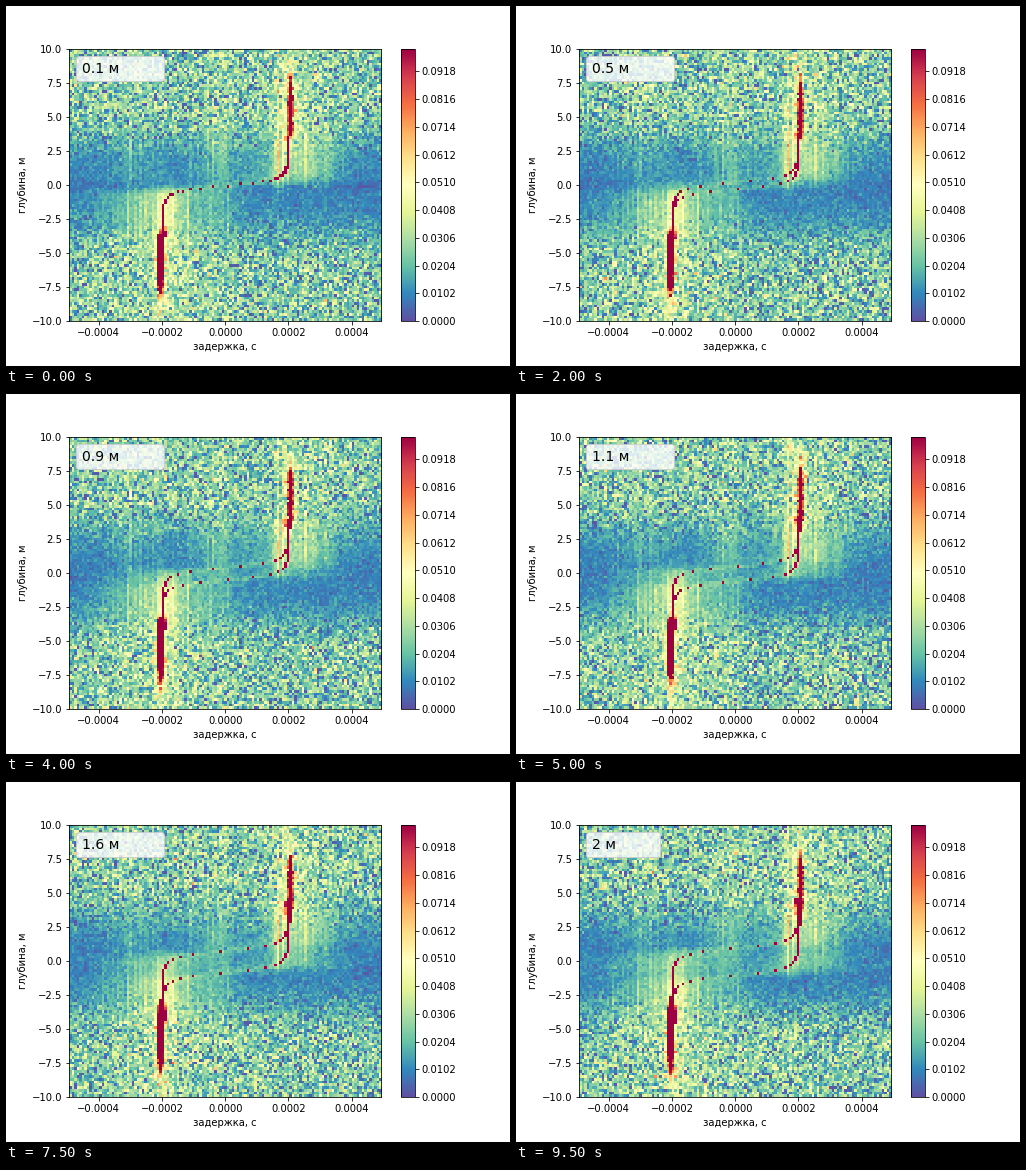
A matplotlib script for the animation above (10 s loop, 504 by 360 pixels).

```python
import numpy as np
import matplotlib.pyplot as plt
from matplotlib.animation import FuncAnimation
from matplotlib.lines import Line2D

plt.rcParams["font.family"] = "DejaVu Sans"
plt.rcParams["font.size"] = 10

COLS, ROWS, FRAMES = 125, 100, 20
LAG_LIMIT = 0.0004941
MAX_DELAY = 0.000203    # s, delay far above or below a source
RANGE = 0.43            # m, sets the steepness of the delay curve
RECEIVER_DEPTH = 0.04

lag_step = 2 * LAG_LIMIT / COLS
cols = np.arange(COLS)
lags = (cols + 0.5) * lag_step - LAG_LIMIT
depths = np.linspace(-10, 10, ROWS + 1)[1:]
dist = np.abs(depths)[:, None]


def smoothstep(v):
    v = np.clip(v, 0, 1)
    return v * v * (3 - 2 * v)


def hump(centre, width):
    """Bell over the delay axis, in microseconds."""
    return np.exp(-((lags * 1e6 - centre) / width) ** 2)


def streaked(level, seed, spread):
    """Sidelobe level per column, broken into fixed thin streaks."""
    rng = np.random.default_rng(seed)
    return 0.0105 + level * np.exp(rng.normal(0, spread, COLS))


above = streaked(0.020 * hump(200, 60) + 0.008 * hump(-35, 65)
                 + 0.007 * hump(300, 60) + 0.006 * hump(-290, 70), 4, 0.5)
below = streaked(0.012 * hump(-230, 130) + 0.013 * hump(-185, 60)
                 + 0.007 * hump(-40, 70), 9, 0.35)
blend = smoothstep((dist - 1.3) / 4.7)            # quiet centre to noisy far field
swell = smoothstep((dist - 2.2) / 2.2)            # ridge widens away from the sources
tip = 1 / (1 + np.exp((dist - 7.3) / 0.33))       # ridge fades at its ends
limit = np.where(depths > 0, 0.72, 1.0)[:, None]
width = 0.42 + (limit - 0.42) * swell


def delay_fraction(source_depth):
    u = depths - source_depth - RECEIVER_DEPTH
    return u / np.hypot(u, RANGE)


def correlogram(k):
    rng = np.random.default_rng(100 + k)
    half = 0.05 * (k + 1)
    branches = np.array([delay_fraction(half), delay_fraction(-half)])
    mix = (1 + branches.mean(axis=0))[:, None] / 2

    near = mix * above + (1 - mix) * below
    near = near * (0.6 + 0.4 * (branches ** 2).mean(axis=0)[:, None])
    far = 0.0265 + 0.35 * (near - 0.018)
    field = near + (far - near) * blend
    field += rng.normal(0, 1, field.shape) * (0.003 + 0.0095 * blend)

    peak = 0.26 * tip * np.exp(rng.normal(0, 0.35, field.shape) * swell)
    ridge = np.zeros_like(field)
    for frac in branches:
        centre = np.floor((frac * MAX_DELAY + LAG_LIMIT) / lag_step)[:, None]
        offset = cols - centre
        glow = 0.022 * swell * np.exp(-(offset / 2.5) ** 2 - (dist / 9.3) ** 12)
        sidelobe = 0.012 * (1 - blend) * np.exp(-np.abs(offset) / 12)
        line = peak * np.exp(-(offset / width) ** 2)
        ridge = np.maximum(ridge, line + glow + sidelobe)
    return np.clip(field + ridge, 0.002, None)


fig, ax = plt.subplots(figsize=(7, 5), dpi=72)
fig.subplots_adjust(left=0.125, right=0.9, bottom=0.125, top=0.88)
image = ax.imshow(correlogram(0), cmap="Spectral_r", vmin=0, vmax=0.1,
                  origin="lower", aspect="auto", interpolation="nearest",
                  extent=(-LAG_LIMIT, LAG_LIMIT, -10, 10))
ax.set_xticks(np.arange(-2, 3) * 0.0002)
ax.set_yticks(np.arange(-10, 10.1, 2.5))
ax.set_xlabel("задержка, с")
ax.set_ylabel("глубина, м")
fig.colorbar(image, ax=ax, fraction=0.15, pad=0.05, aspect=20,
             ticks=np.arange(10) * 0.0102, format="%.4f")
blank = Line2D([], [], linestyle="none", label="0.1 м")
legend = ax.legend(handles=[blank], loc="upper left", fontsize=14,
                   markerfirst=False, framealpha=0.8)
label = legend.get_texts()[0]


def update(k):
    image.set_data(correlogram(k))
    label.set_text(f"{(k + 1) / 10:g} м")
    return image, legend


anim = FuncAnimation(fig, update, frames=FRAMES, interval=500,
                     repeat=True, repeat_delay=0, blit=False)
plt.show()
```
